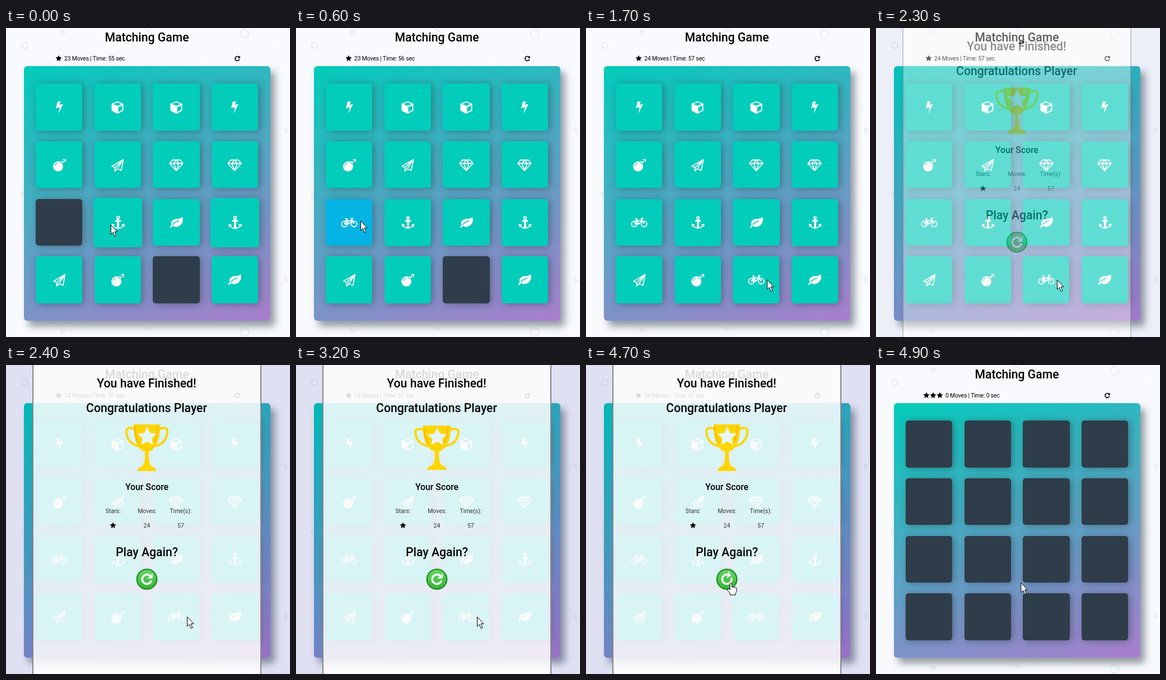
Recreate the animation shown at these times as an HTML page. Size 507 by 551 pixels, loop 6400 ms.

```html
<!DOCTYPE html>
<html lang="en">
<head>
<meta charset="utf-8">
<title>Matching Game</title>
<style>
  html, body { margin: 0; width: 100%; height: 100%; overflow: hidden; background: #f8fafd; }
  svg { position: absolute; left: 0; top: 0; overflow: visible; }
  text { font: 10.5px Roboto, "Open Sans", sans-serif; }
  text.big { font-size: 21.2px; font-weight: 500; }
  text.mid { font-size: 15.8px; font-weight: 500; }
  .c { text-anchor: middle; }
  #status { letter-spacing: -.2px; }
  #deck {
    position: absolute; left: 32px; top: 68px; width: 440px; height: 454px; border-radius: 6px;
    background: linear-gradient(160deg, #02ccba, #aa7ecd);
    box-shadow: 8px 10px 13px rgba(46, 61, 73, .5);
  }
  .card {
    position: absolute; width: 83.4px; height: 83.5px; border-radius: 5px;
    box-shadow: 3.3px 1.3px 13px rgba(46, 61, 73, .5);
  }
  .card svg { left: 41.7px; top: 42px; width: 1px; height: 1px; }
  .fill { fill: #fff; fill-rule: evenodd; }
  .line { fill: none; stroke: #fff; stroke-width: 1.8; stroke-linejoin: round; }
  #decor { fill: none; stroke: #e6e9ec; stroke-width: 1.5; }
</style>
</head>
<body>
<svg width="507" height="551">
  <defs>
    <path id="star" d="M0-5.6 1.7-1.9 5.6-1.5 2.7 1.2 3.5 5.1 0 3.1-3.5 5.1-2.7 1.2-5.6-1.5-1.7-1.9Z"/>
    <g id="reload">
      <path d="M9.2 2.5A9.5 9.5 0 1 1 6.5-7" fill="none" stroke-width="4"/>
      <path d="M11.5-12V-1.5H1Z" stroke="none"/>
    </g>
    <g id="tile">
      <path d="M97 5 106 7 100 13Z M34 25 39 28V34L34 37 28 34V28Z M247 2 257 7 M497 177 501 179 497 182 502 185 498 187"/>
      <circle cx="426" cy="10" r="7.5"/>
      <path d="M479 27h2M351 54h2"/>
    </g>
  </defs>
  <g id="decor">
    <use href="#tile"/><use href="#tile" y="266.5"/><use href="#tile" y="532"/>
  </g>
  <text class="big c" x="251.5" y="24">Matching Game</text>
  <g id="stars"></g>
  <text id="status" y="58"></text>
  <use href="#reload" transform="translate(413 54.5) scale(.42)" stroke="#000"/>
</svg>

<div id="deck"></div>

<svg id="modal" width="507" height="551">
  <defs>
    <linearGradient id="green" x2="0" y2="1">
      <stop stop-color="#62d862"/><stop offset="1" stop-color="#36b436"/>
    </linearGradient>
  </defs>
  <path d="M0 0H507V551H0Z" fill="#080896" fill-opacity=".1"/>
  <path d="M48 0H455V551H48Z" fill="#fff" fill-opacity=".85"/>
  <path d="M48 0V551M455 0V551" stroke="#858589" stroke-width="2"/>
  <text class="big c" x="251" y="40">You have Finished!</text>
  <text class="big c" x="251" y="84">Congratulations Player</text>
  <g id="trophy">
    <g id="handle">
      <path d="M-22-33C-30-37-38-36-36.500-27C-35-15-28-6-15-3" fill="none" stroke="#ffd500" stroke-width="4"/>
    </g>
    <use href="#handle" transform="scale(-1 1)"/>
    <path d="M-24-41.500H24C24-18 18 3 3.500 7C3 18 4 29 8 33Q16 35 17 41.500H-17Q-16 35-8 33C-4 29-3 18-3.500 7C-18 3-24-18-24-41.500Z" fill="#ffd500"/>
    <path d="M-22-39Q-21-19-15-8M19-39Q18-22 13-10" fill="none" stroke="#f9ad1c" stroke-width="1.800"/>
    <use href="#star" transform="translate(.5 -20.500) scale(3.050)" fill="#e6f6f7"/>
  </g>
  <text class="mid c" x="251.500" y="223">Your Score</text>
  <g fill="#333">
    <text class="c" x="191" y="264">Stars:</text>
    <text class="c" x="252" y="264">Moves:</text>
    <text class="c" x="312" y="264">Time(s):</text>
    <text class="c" x="251.500" y="290">24</text>
    <text class="c" x="312" y="290">57</text>
  </g>
  <use href="#star" x="191" y="286"/>
  <text class="big c" x="251.500" y="341">Play Again?</text>
  <g transform="translate(251.500 382)">
    <circle r="17.800" fill="url(#green)" stroke="#168416" stroke-width="2"/>
    <use id="again" href="#reload" fill="#fff" stroke="#fff"/>
  </g>
</svg>

<svg width="507" height="551">
  <g id="cursor" fill="#fff" stroke="#000" stroke-linejoin="round">
    <path id="arrow" d="M.5.500V17.500L4.300 14 7.300 21.300 10 20.200 7 13H12Z"/>
    <path id="hand" d="M-1.500 13V1.500Q0-1 1.700 1.500V8Q3.500 6.800 4.700 8.500 6.500 7.300 7.700 9.300 10.500 8.500 10.500 11V16L8.500 19V22H-1.500V19L-6.500 13Q-6.500 10-4 11Z"/>
  </g>
</svg>

<script>
const $ = id => document.getElementById(id);
const LOOP = 6400, RESET = 4900;
const DARK = '#2e3d49', OPEN = '#02b3e4', MATCH = '#02ccba';

// Each icon: filled path, stroked path
const icons = {
  bolt: ['M-3-10H2.700L.5-4 7-5.500-1.700 12 .8.300-6 2Z', ''],
  cube: ['M0-10.500 10.500-6V6.500L0 12-10.500 6.500V-6ZM-7.500-5.500 0-2.300 7.500-5.500 0-8.500ZM1.500.300V9L8.500 5.300V-2.700Z', ''],
  bomb: ['M-11 2.800a9 9 0 1 0 18 0a9 9 0 1 0-18 0ZM1-5 3.500-7 7-3.500 5-1ZM-8 2Q-7.500-3-3-3.500L-3-2.500Q-6.500-2-7 2Z',
    'M6-4.500 8-6.500M6.500-9.300H11V-4.800M9-7.300 11-9.300'],
  plane: ['', 'M10.500-9.500-10 2.500-4.500 5V11L-.5 7 6.800 9.700ZM-4.500 5 10.500-9.500-.5 7'],
  diamond: ['', 'M-7-8.500H7L12-2.500 0 10.500-12-2.500ZM-12-2.500H12M0-8.500-4.500-2.500 0 10.500 4.500-2.500Z'],
  bike: ['', 'M-13.700 2.500a5 5 0 1 0 10 0a5 5 0 1 0-10 0M3.700 2.500a5 5 0 1 0 10 0a5 5 0 1 0-10 0M-8.700 2.500-5-3.500H4.500L-.5 2.500H-8.700M-7.500-6.500H-3M-5.500-6-.5 2.500M8.700 2.500 3.500-7.500H7.500'],
  anchor: ['M-11.500 2 -5.500 3.500-10.500 8ZM11.500 2 5.500 3.500 10.500 8Z',
    'M-2.200-8.500a2.200 2.200 0 1 0 4.400 0a2.200 2.200 0 1 0-4.400 0M0-6V10M-1-6V9M1-6V9M-5-2.500H5M-5-3.500H5M-9 5Q-6 9.500 0 9.800 6 9.500 9 5'],
  leaf: ['M11-10Q14-1 7 5 0 10-6 6L-10 9.500-11.500 7.500-8.500 4.500Q-11-4-2-6.500 8-6.500 11-10ZM-6 4.500Q-2-.5 5-2.500V-4Q-3-2-7 3Z', '']
};
const layout = 'bolt cube cube bolt bomb plane diamond diamond bike anchor leaf anchor plane bomb bike leaf'.split(' ');

const cards = layout.map((name, i) => {
  const el = document.createElement('div'), [fill, line] = icons[name];
  el.className = 'card';
  el.style.left = 21 + i % 4 * 104.6 + 'px';
  el.style.top = 31 + (i >> 2) * 102.8 + 'px';
  el.innerHTML = `<svg><path class="fill" d="${fill}"/><path class="line" d="${line}"/></svg>`;
  $('deck').append(el);
  return { el, name, icon: el.firstChild, openAt: i == 8 ? 500 : i == 14 ? 1600 : -1 };
});

const clamp = x => Math.max(0, Math.min(1, x));
const pulse = (t, start) => 1 + .05 * Math.sin(Math.PI * clamp((t - start) / 650)) ** 2;

// Linear interpolation through [time, x, y] points
function track(keys, t) {
  const n = keys.findIndex(k => k[0] > t);
  if (n < 0) return keys.at(-1).slice(1);
  if (!n) return keys[0].slice(1);
  const a = keys[n - 1], b = keys[n], p = (t - a[0]) / (b[0] - a[0]);
  return [1, 2].map(i => a[i] + (b[i] - a[i]) * p);
}
const cursorPath = [[0, 187, 350.5], [300, 113, 343], [500, 115, 343.5], [700, 115, 343.5], [1100, 307, 436],
  [1300, 323, 448.5], [3250, 323, 448.5], [3600, 227, 367], [3900, 258.5, 388]];
const stretch = [[2920, 1, 1], [3000, 1.1, .91], [3100, .87, 1.16], [3200, 1.05, .95], [3300, .98, 1.02], [3500, 1, 1]];

function draw(now) {
  const t = now % LOOP, fresh = t >= RESET;
  const moves = fresh ? 0 : t < 1600 ? 23 : 24;
  const secs = fresh ? 0 : t < 550 ? 55 : t < 1600 ? 56 : 57;
  $('status').textContent = `${moves} Moves | Time: ${secs} sec`;
  $('status').setAttribute('x', fresh ? 124 : 104);
  $('stars').innerHTML = (fresh ? [90, 102, 114] : [94]).map(x => `<use href="#star" x="${x}" y="54"/>`).join('');

  for (const { el, name, icon, openAt } of cards) {
    const shown = !fresh && t >= openAt;
    const waiting = name == 'bike' && t < 1600;
    el.style.background = !shown ? DARK : waiting ? OPEN : MATCH;
    icon.style.display = shown ? '' : 'none';
    const start = name == 'anchor' ? -325 : name == 'bike' ? 1650 : LOOP;
    el.style.transform = `scale(${pulse(t, start)})`;
  }

  $('modal').style.opacity = fresh ? 0 : clamp((t - 2240) / 140);
  $('trophy').setAttribute('transform', `translate(251.5 147.5) scale(${track(stretch, t)})`);
  $('again').setAttribute('transform', `rotate(${360 * clamp((t - 4210) / 540)}) scale(.88)`);

  const over = t >= 3680 && !fresh;
  $('cursor').setAttribute('transform', `translate(${track(cursorPath, t)})`);
  $('arrow').style.display = over ? 'none' : '';
  $('hand').style.display = over ? '' : 'none';
}

const begin = performance.now();
(function frame() {
  draw(performance.now() - begin);
  requestAnimationFrame(frame);
})();
</script>
</body>
</html>
```
